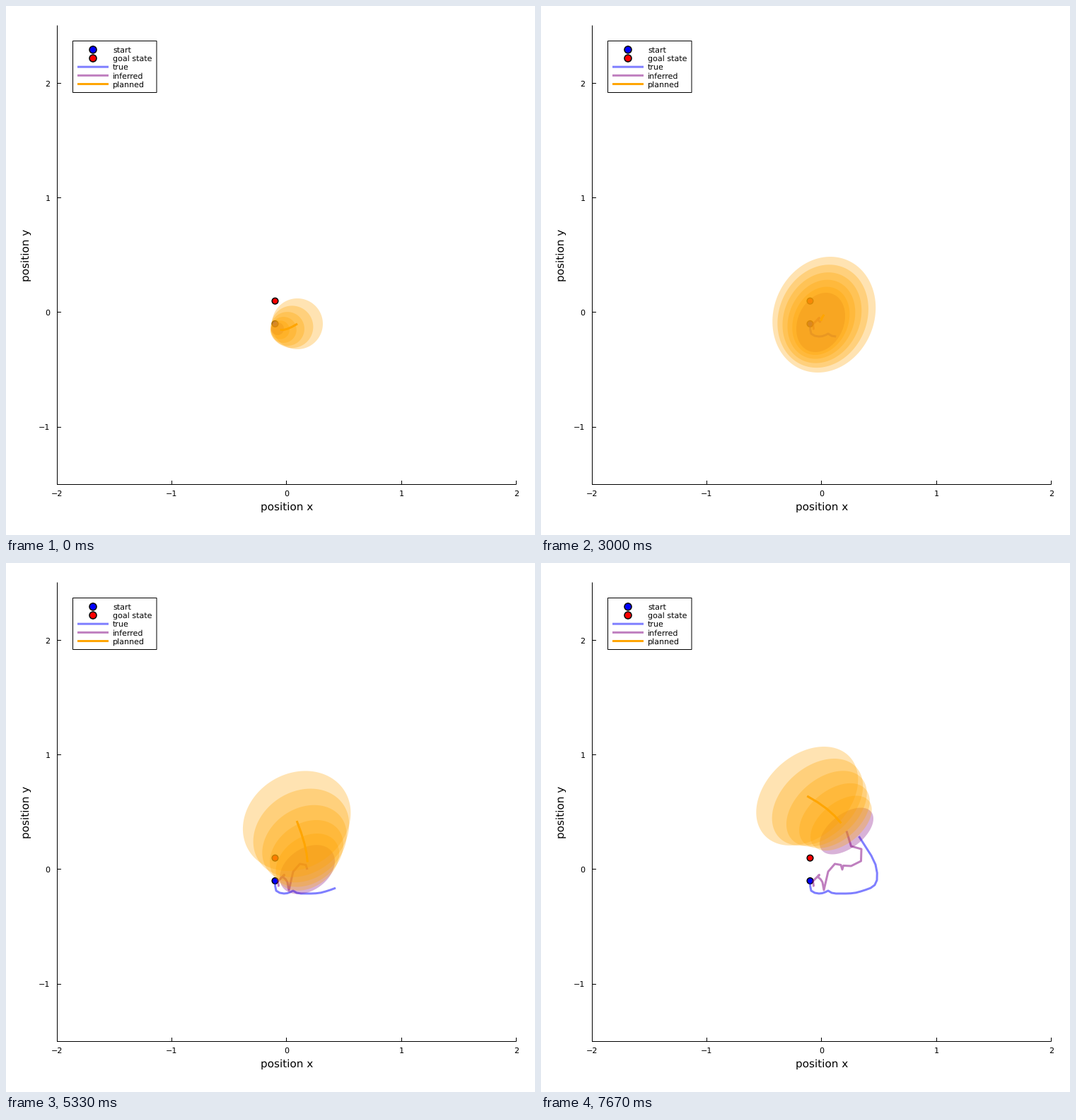
A matplotlib script for the animation above (8 s loop, 748 px wide and 749 px high).

```python
import numpy as np
import matplotlib.pyplot as plt
from matplotlib.animation import FuncAnimation
from matplotlib.patches import Circle, Polygon, Rectangle

W, H, DPI = 748, 749, 128
LOOP_MS, TICK_MS, STEPS, HORIZON = 8000, 40, 24, 5
LEAD_MS = 30    # keeps each step from starting a tick late
GROWTH = 1.15   # how the uncertainty widens along the plan
plt.rcParams.update({"font.family": "DejaVu Sans", "text.hinting": "none"})


def pt(pixels):
    return pixels * 72 / DPI


# Key points as step: value, in stage pixels
TRUE = {0: (380.5, 450), 2: (382, 464), 4: (393, 468), 6: (402, 466), 7: (406, 464),
        8: (411, 467), 10: (424, 468), 14: (452, 465), 18: (475, 449), 20: (473, 427),
        23: (449.5, 387)}
INFERRED = {0: (384, 457), 3: (385.5, 457), 4: (384.5, 450.5), 7: (393.5, 441.5),
            8: (391.5, 444.5), 9: (395.5, 448), 11: (398, 452), 12: (400, 463),
            13: (406, 437), 14: (415.5, 426), 15: (424, 427.5), 16: (426, 434),
            17: (427.5, 428.5), 18: (438.5, 429), 20: (452.5, 422), 21: (453, 405),
            22: (438.5, 401), 23: (432, 379.5)}
PLAN_END = {0: (412, 450), 2: (416, 435), 4: (399, 420), 6: (418, 422), 7: (400, 438),
            11: (400.5, 436), 12: (426, 431), 13: (416, 376), 14: (415.5, 359.5),
            17: (409, 368), 18: (421, 362), 20: (431, 357), 21: (423.5, 333.5),
            23: (376.3, 330)}

# Half extents and tilt of the inferred belief and of the last planned one
NEAR = {0: (9, 9, 0), 4: (16.5, 23.5, 0.6), 9: (34.5, 42, 0.22), 14: (36.5, 44.5, 0.02),
        18: (41.5, 25, 0.65), 21: (44.5, 26, 0.5), 23: (38, 33, 0.53)}
FAR = {0: (36, 36, 0), 4: (48, 60, 0.38), 9: (73, 82, 0.12), 14: (74, 82.5, -0.04),
       18: (78.5, 59, 0.36), 21: (82.5, 61.5, 0.29), 23: (72, 70, 0.33)}
BEND = {0: (-3, 4.5), 4: (2.3, 1), 9: (-1, 0), 14: (5, 4), 18: (5.3, 6), 21: (4.7, 0),
        23: (5.5, -2)}


def linear(keys, step):
    columns = np.array(list(keys.values())).T
    return np.array([np.interp(step, list(keys), column) for column in columns])


def smooth(keys, step):
    """Cubic Hermite curve through the key points."""
    steps, points = np.array(list(keys)), np.array(list(keys.values()))
    slopes = np.gradient(points, steps, axis=0)
    i = min(np.searchsorted(steps, step, "right") - 1, len(steps) - 2)
    gap = steps[i + 1] - steps[i]
    u = (step - steps[i]) / gap
    ease = u * u * (3 - 2 * u)
    return (points[i] + (points[i + 1] - points[i]) * ease
            + gap * u * (1 - u) * (slopes[i] * (1 - u) - slopes[i + 1] * u))


TRUE_PATH = np.array([smooth(TRUE, s) for s in range(STEPS)])
INFERRED_PATH = np.array([linear(INFERRED, s) for s in range(STEPS)])
ANGLE = np.linspace(0, 2 * np.pi, 120)


def ellipse(cx, cy, w, h, tilt):
    """Outline of a covariance ellipse with half extents w, h and correlation tilt."""
    x = cx + w * np.cos(ANGLE)
    y = cy - h * (tilt * np.cos(ANGLE) + np.sqrt(1 - tilt ** 2) * np.sin(ANGLE))
    return np.column_stack([x, y])


def beliefs(step):
    """Inferred belief followed by the planned ones: cx, cy, w, h, tilt."""
    start = np.append(INFERRED_PATH[step], linear(NEAR, step))
    end = np.append(linear(PLAN_END, step), linear(FAR, step))
    t = np.linspace(0, 1, HORIZON + 1)[:, None]
    ease = np.hstack([t, t, t ** GROWTH, t ** GROWTH, t])
    states = start + (end - start) * ease
    states[:, :2] += 4 * t * (1 - t) * linear(BEND, step)
    return states


fig = plt.figure(figsize=(W / DPI, H / DPI), dpi=DPI, facecolor="white")
ax = fig.add_axes([0, 0, 1, 1])
ax.set(xlim=(0, W), ylim=(H, 0))
ax.axis("off")


def line(xs, ys, color="black", width=1, alpha=1, z=1):
    return ax.plot(xs, ys, color=color, lw=pt(width), alpha=alpha, zorder=z, snap=False,
                   solid_capstyle="butt", solid_joinstyle="round")[0]


def text(x, y, label, size=11.1, ha="center", rotation=0):
    ax.text(x, y, label, fontsize=pt(size), ha=ha, va="baseline",
            rotation=rotation, rotation_mode="anchor", zorder=12)


def dot(x, y, color, radius, z):
    ax.add_patch(Circle((x, y), radius, fc=color, ec="black", lw=pt(1.5), zorder=z))


# Axes, with lines centred on whole pixels
LEFT, RIGHT, TOP, BOTTOM, UNIT = 72.5, 721.5, 27.5, 677.5, 162.2
line([LEFT, LEFT], [TOP, BOTTOM + 0.5])
line([LEFT, RIGHT], [BOTTOM, BOTTOM])
for value in range(-2, 3):
    label = str(value).replace("-", "\u2212")
    x = np.floor(LEFT + (value + 2) * UNIT) + 0.5
    y = np.floor(433.8 - value * UNIT) + 0.5
    line([x, x], [BOTTOM, BOTTOM - 5.5])
    text(x, 694, label)
    if value > -2:
        line([LEFT, LEFT + 5.5], [y, y])
        text(62.5, y + 4, label, ha="right")
text(396.8, 714, "position x", 15.28)
text(33, 352.8, "position y", 15.28, rotation=90)

# Legend
ax.add_patch(Rectangle((94.5, 49.5), 118.5, 73, fc="white", ec="black", lw=pt(1),
                       zorder=10, snap=False))
STYLES = {"true": ("blue", 0.5), "inferred": ("purple", 0.5), "planned": ("orange", 1)}
MARKS = {"start": "blue", "goal state": "red"}
for row, name in enumerate([*MARKS, *STYLES]):
    y = 61.9 + 12.15 * row
    text(151, y + 4, name, ha="left")
    if name in MARKS:
        dot(123, y, MARKS[name], 5, 11)
    else:
        color, alpha = STYLES[name]
        line([101, 145], [y, y], color, 3, alpha, 11)

# Moving parts
dot(380.5, 450, "blue", 4.3, 2)
dot(380.5, 417.7, "red", 4.3, 2)
paths = {name: line([], [], color, 3, alpha, z)
         for (name, (color, alpha)), z in zip(STYLES.items(), (3, 4, 6))}
blobs = []
for i in range(HORIZON + 1):
    blob = Polygon(np.zeros((3, 2)), fc="orange" if i else "purple", alpha=0.3,
                   lw=0, zorder=7 if i else 5)
    blobs.append(ax.add_patch(blob))


def draw(tick):
    step = (tick * TICK_MS + LEAD_MS) * STEPS // LOOP_MS
    states = beliefs(step)
    paths["true"].set_data(*TRUE_PATH[:step + 1].T)
    paths["inferred"].set_data(*INFERRED_PATH[:step + 1].T)
    paths["planned"].set_data(*states[1:, :2].T)
    for blob, state in zip(blobs, states):
        blob.set_xy(ellipse(*state))
    return [*paths.values(), *blobs]


anim = FuncAnimation(fig, draw, frames=LOOP_MS // TICK_MS, interval=TICK_MS,
                     repeat=True, repeat_delay=0, blit=False)
plt.show()
```
